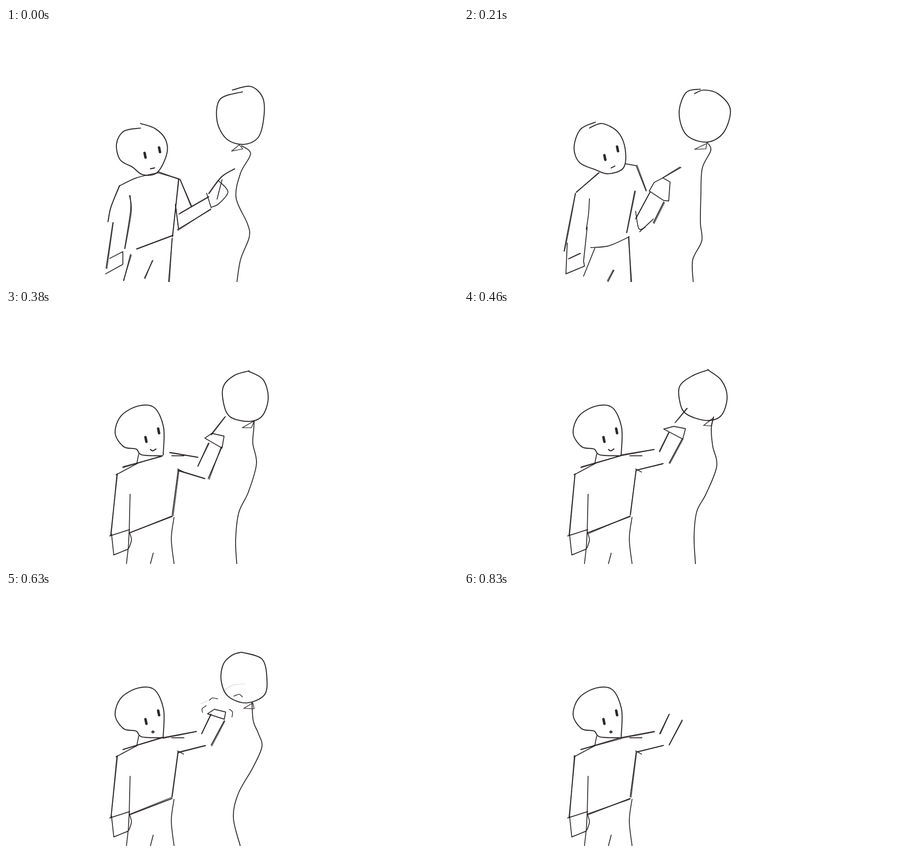
Write an HTML page that moves like this. It is 998 px wide and 561 px high and loops after 870 ms.

```html
<!DOCTYPE html>
<html lang="en">
<head>
<meta charset="utf-8">
<title>Balloon sketch</title>
<style>
  html, body { margin: 0; width: 100%; height: 100%; overflow: hidden; background: #fff; }
  svg { display: block; width: 100vw; height: 100vh; }
  path { fill: none; stroke: #211b1d; stroke-linecap: round; stroke-linejoin: round; }
</style>
</head>
<body>
<svg id="stage" viewBox="0 0 998 561"></svg>
<script>
const NS = "http://www.w3.org/2000/svg";
const stage = document.getElementById("stage");
const LOOP = 870;

// Strokes are split by "/": plain = smooth curve, ^ = straight corners, ~ = sketched twice.
const start = {
  head: "297 211 329 222 352 246 355 278 334 319 302 324 279 307 252 291 244 256 260 228 297 221",
  eyes: "307 281/339 269",
  mouth: "319 311 328 309",
  body: "250 349 288 331 335 320/~337 318 382 334/~381 333 368 460/~288 488 368 458",
  sleeve: "~250 349 232 395 225 428/~236 430 221 530/~274 370 275 404 262 487/^229 509 258 494 258 522 220 543",
  legs: "~275 500 260 558/~323 514 307 553/~367 465 359 560",
  arm: "~384 334 410 394/~374 390 381 443/~382 411 448 373/~379 445 452 401",
  hand: "443 365 453 397/~448 366 476 329 505 311/477 335 466 378/470 338 490 362 470 388 453 396"
};
const startBalloon = {
  outline: "500 137 540 129 566 152 570 190 558 240 525 257 487 245 466 205 473 157 522 141",
  knot: "515 258 498 272 523 267",
  string: "520 260 540 278 518 320 508 375 533 432 537 462 518 511 510 560"
};

const lower = {
  head: "277 221 305 211 340 230 356 268 352 309 318 322 290 313 255 297 243 264 257 224 290 208",
  eyes: "311 286/339 267",
  mouth: "325 309 333 305",
  body: "357 300 380 304/~248 363 297 320/~377 360 359 452/280 485 320 481 365 461",
  sleeve: "~246 365 229 450 221 493/277 377 275 410 270 445/^272 440 264 515 266 526 225 543 228 475/~231 510 257 498",
  legs: "289 486 264 548/~363 461 370 560/~331 535 318 560",
  arm: "~380 304 402 360/~411 362 380 420/379 405 386 443 400 440/~441 384 418 430/388 450 418 422",
  hand: "^439 331 455 340 452 382 441 381 409 360 420 341 439 331/~439 331 479 308"
};
const lowerBalloon = {
  outline: "509 145 530 137 562 146 588 180 573 231 536 252 491 236 475 188 490 143 522 135",
  knot: "536 255 509 268 534 267",
  string: "536 252 545 270 526 310 523 370 522 430 525 470 505 512 506 560"
};

const raise = {
  head: "305 212 270 220 243 252 247 290 285 308 300 318 347 320 352 270 340 232 300 210",
  eyes: "309 283/337 267",
  mouth: "317 305 322 308 329 306",
  body: "^294 312 292 338/^248 350 300 331 345 315 354 307 380 301/~380 365 371 455/288 487 371 457",
  sleeve: "~247 350 231 440/231 440 222 500/277 354 273 440 270 495/^221 501 245 494 268 500 268 528 229 545 221 501",
  legs: "278 490 270 560/369 460 361 560/~326 538 321 560",
  arm: "~377 308 428 343/~441 318 416 376/~378 355 437 406/~471 322 440 406",
  hand: "^437 303 446 288 474 295 471 325 437 303/~440 300 474 256"
};
const raiseBalloon = {
  outline: "532 138 567 152 577 195 565 233 540 248 500 243 484 208 484 168 505 143 534 137",
  knot: "545 252 514 265 538 264",
  string: "545 252 548 264 541 290 548 335 535 400 514 450 506 515 508 560"
};

const reach = {
  head: "347 320 348 260 328 216 292 212 254 234 241 272 260 302 287 307 300 320 346 322",
  eyes: "309 286/337 267",
  body: "293 318 289 338/~258 348 345 322/^290 339 243 364/~273 492 367 456/~380 355 367 452/366 322 393 322/^379 351 392 358",
  sleeve: "~245 362 232 497/274 407 272 490/^229 499 273 485/^233 495 238 541 270 528 272 488/272 490 277 507 272 525",
  legs: "270 525 266 560/371 458 365 505 371 560/325 537 319 560"
};
const reachBalloon = {
  outline: "538 132 568 155 581 192 568 233 535 244 490 229 476 200 477 167 505 145 540 132",
  knot: "551 238 529 255 546 256",
  string: "551 236 546 262 549 300 558 345 535 405 514 445 508 500 511 560"
};
const swayBalloon = {
  outline: "520 133 565 148 576 190 570 228 530 245 490 230 475 195 480 159 500 139 520 133",
  knot: "545 245 525 257 548 258",
  string: "543 243 546 285 557 312 565 342 545 388 513 445 502 498 517 560"
};

const smile = { mouth: "319 308 324 311 331 307" };
const gasp = { mouth: "322 309 324 307 327 309 324 311 322 309" };
const reachArm = { arm: "~345 322 420 308/~453 270 432 313/~380 354 440 339/~482 284 453 338" };
const pokeHand = { hand: "^441 263 463 257 489 262 483 285 441 263/~466 249 492 217" };
const openHand = {
  hand: "^445 269 460 259 485 265 482 281 445 269",
  shock: "449 239 456 234 467 236/434 266 433 258 442 251/493 259 500 265 499 276/503 230 515 226 522 232",
  faint: "478 220 500 206 528 203/430 247 445 240"
};

const WIDTH = { head: 2.2, outline: 2.2, string: 2, knot: 1.7, mouth: 2.4, shock: 1.6, faint: 1.1 };

// Blends two parts that share the same layout
function blend(a, b, k) {
  const goal = b.match(/\d+/g);
  let i = 0;
  return a.replace(/\d+/g, n => +n + (goal[i++] - n) * k);
}

function blendAll(a, b, k) {
  return Object.fromEntries(Object.keys(a).map(key => [key, blend(a[key], b[key], k)]));
}

let seed = 7;
function jitter(size) {
  seed = seed * 16807 % 2147483647;
  return (seed / 2147483647 - 0.5) * 2 * size;
}

// Catmull-Rom curve through the points
function curve(p) {
  let d = `M${p[0]}`;
  for (let i = 0; i < p.length - 1; i++) {
    const a = p[i - 1] || p[i], b = p[i], c = p[i + 1], e = p[i + 2] || c;
    const c1 = b.map((v, k) => v + (c[k] - a[k]) / 6);
    const c2 = c.map((v, k) => v - (e[k] - b[k]) / 6);
    d += `C${c1} ${c2} ${c}`;
  }
  return d;
}

function ink(group, d, width, opacity = 0.95) {
  const path = document.createElementNS(NS, "path");
  path.setAttribute("d", d);
  path.setAttribute("stroke-width", width);
  path.setAttribute("opacity", opacity);
  group.append(path);
}

function drawStroke(group, text, key) {
  const nums = text.match(/[\d.]+/g).map(Number);
  const points = [];
  for (let i = 0; i < nums.length; i += 2) points.push([nums[i], nums[i + 1]]);
  const width = WIDTH[key] || 1.9;
  if (key === "eyes") {
    const [x, y] = points[0];
    ink(group, `M${x - 1} ${y - 5}L${x + 1} ${y + 5}`, 5.5);
  } else if (key === "knot") {
    ink(group, `M${points.join("L")}Z`, width, 0.85);
  } else if (text[0] === "^") {
    ink(group, `M${points.join("L")}`, width);
  } else {
    ink(group, curve(points), width, key === "faint" ? 0.2 : 0.93);
  }
  if (text[0] === "~") {
    const again = points.map(p => p.map(v => v + jitter(2.2)));
    ink(group, curve(again), 2, 0.7);
  }
}

function makePose(time, ...layers) {
  const group = document.createElementNS(NS, "g");
  for (const [key, part] of Object.entries(Object.assign({}, ...layers))) {
    part.split("/").forEach(s => drawStroke(group, s, key));
  }
  stage.append(group);
  return { time, group };
}

const turn = {
  arm: blend(raise.arm, reachArm.arm, 0.5),
  hand: blend(raise.hand, pokeHand.hand, 0.5)
};
const poses = [
  makePose(0, start, startBalloon),
  makePose(210, lower, lowerBalloon),
  makePose(290, raise, raiseBalloon),
  makePose(380, reach, smile, turn, blendAll(raiseBalloon, reachBalloon, 0.5)),
  makePose(460, reach, smile, reachArm, pokeHand, reachBalloon),
  makePose(540, reach, smile, reachArm, pokeHand, blendAll(reachBalloon, swayBalloon, 0.5)),
  makePose(630, reach, gasp, reachArm, openHand, swayBalloon),
  makePose(830, reach, gasp, reachArm)
];

function show(t) {
  const current = poses.filter(p => p.time <= t).pop();
  poses.forEach(p => p.group.setAttribute("display", p === current ? "inline" : "none"));
}

const began = performance.now();
function tick() {
  show((performance.now() - began) % LOOP);
  requestAnimationFrame(tick);
}
tick();
</script>
</body>
</html>
```
